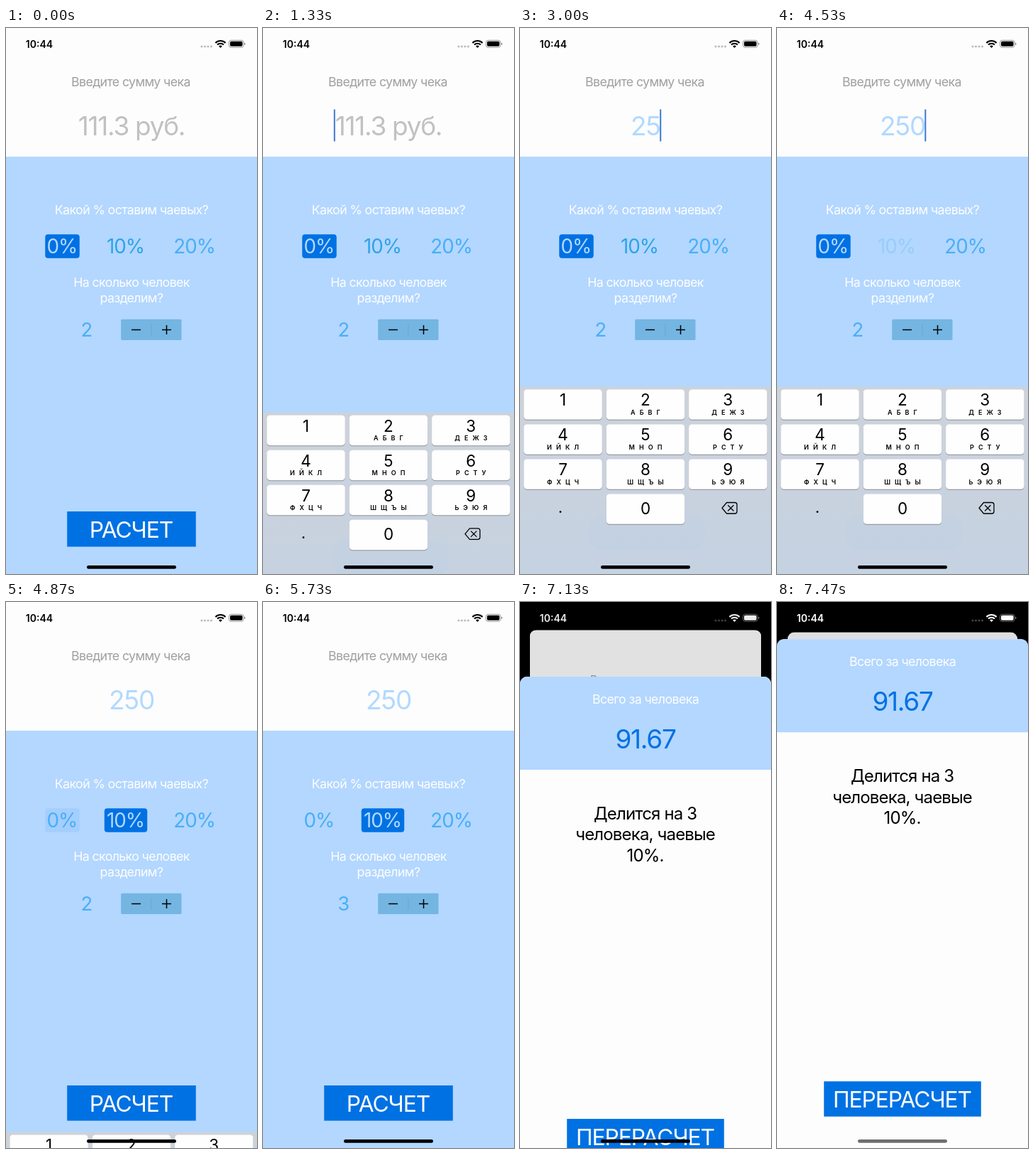
Write an HTML page that moves like this. It is 354 by 768 pixels and loops after 8000 ms.

```html
<!DOCTYPE html>
<html lang="ru">
<head>
<meta charset="utf-8">
<title>Калькулятор чаевых</title>
<style>
  html, body { margin: 0; height: 100%; overflow: hidden; background: #000; }
  svg { display: block; width: 100%; height: 100%; }
  text {
    font-family: Inter, "Noto Sans", sans-serif;
    font-weight: 400;
    letter-spacing: -.035em;
    text-anchor: middle;
    white-space: pre;
  }
  .digit { letter-spacing: 0; }
  .letters { font-weight: 600; letter-spacing: 1.9px; }
  .clock { font-weight: 600; letter-spacing: 0; }
</style>
</head>
<body>
<svg id="stage" viewBox="0 0 354 768"></svg>
<script>
const DURATION = 8000, FPS = 15;
const BLUE = '#0071e3', PALE = '#b3d7ff', SKY = '#4aaef8', WHITE = '#fdfdfe';

const rect = (x, y, w, h, fill, extra = '') =>
  `<rect x="${x}" y="${y}" width="${w}" height="${h}" fill="${fill}" ${extra}/>`;
const text = (x, y, size, fill, content, extra = '') =>
  `<text x="${x}" y="${y}" font-size="${size}" fill="${fill}" ${extra}>${content}</text>`;

const tipOption = (id, x, w, label) =>
  rect(x - w / 2, 290.2, w, 33.6, BLUE, `rx="4" id="${id}Box"`) +
  text(x - .5, 316.5, 27.8, SKY, label, `id="${id}"`);

function key(index, digit, letters) {
  const x = 5.3 + (index % 3) * 116.4, y = 508.5 + Math.floor(index / 3) * 49;
  const mid = x + 55.2;
  return rect(x, y + 1, 110.5, 42.3, '#8b8f96', 'rx="4.5"') +
    rect(x, y, 110.5, 42.3, '#fefefe', 'rx="4.5"') +
    text(mid, y + 22.7, 22.5, '#000', digit, 'class="digit"') +
    text(mid + 1, y + 35.5, 9, '#000', letters.split('').join(' '), 'class="letters"');
}

const keyLetters = ['', 'АБВГ', 'ДЕЖЗ', 'ИЙКЛ', 'МНОП', 'РСТУ', 'ФХЦЧ', 'ШЩЪЫ', 'ЬЭЮЯ'];

const calculator = `
  <g id="calculator" clip-path="url(#card)">
    ${rect(0, 0, 354, 768, PALE)}
    ${rect(0, 0, 354, 181, WHITE)}
    ${text(176, 82, 17.8, '#a0a0a2', 'Введите сумму чека')}
    ${text(177, 151, 37, '#c1c1c3', '', 'id="amount"')}
    ${rect(99.8, 114.5, 2, 45, '#3d7ad0', 'id="caret"')}
    ${text(177, 262, 17.8, WHITE, 'Какой % оставим чаевых?')}
    ${tipOption('tip0', 79.5, 48.5, '0%')}
    ${tipOption('tip10', 169, 60.5, '10%')}
    ${text(265.7, 316.5, 27.8, SKY, '20%')}
    ${text(177, 364.3, 17.8, WHITE, 'На сколько человек')}
    ${text(177, 386, 17.8, WHITE, 'разделим?')}
    ${text(113.3, 434, 27.5, SKY, '', 'id="people"')}
    ${rect(162.2, 409.8, 85.3, 29.2, '#74b5e2', 'rx="1.5"')}
    ${rect(204.4, 416, 1, 17, '#69a9d8')}
    <path d="M177 424.5h13M220 424.5h13M226.5 418v13" stroke="#000" stroke-width="1.5"/>
    ${rect(86.2, 680, 181.6, 49.6, BLUE)}
    ${text(176.5, 716.5, 31.8, WHITE, 'РАСЧЕТ', 'id="calculate"')}
    ${rect(0, 0, 354, 768, '#000', 'id="shade"')}
  </g>`;

const keyboard = `
  <g id="keyboard">
    ${rect(0, 504.5, 354, 264, 'url(#tray)')}
    ${rect(97, 684, 165, 51, '#b9cde3', 'rx="22" opacity=".35"')}
    ${keyLetters.map((letters, i) => key(i, i + 1, letters)).join('')}
    ${key(10, '', '')}
    ${text(177, 684, 22.5, '#000', '0', 'class="digit"')}
    ${text(57, 681.5, 22.5, '#000', '.', 'class="digit"')}
    <path d="M291.5 667.5h11.5q3 0 3 3v9.5q0 3-3 3h-11.5l-6.5-7.75zM293.5 671.5l7.5 7.5m0-7.5l-7.5 7.5"
      fill="none" stroke="#000" stroke-width="1.3" stroke-linejoin="round" stroke-linecap="round"/>
  </g>`;

const sheet = `
  <g id="sheet">
    <path d="M0 900V61.7a9.7 9.7 0 0 1 9.7-9.7h334.6a9.7 9.7 0 0 1 9.7 9.7v838z" fill="${WHITE}"/>
    <path d="M0 183V61.7a9.7 9.7 0 0 1 9.7-9.7h334.6a9.7 9.7 0 0 1 9.7 9.7V183z" fill="${PALE}"/>
    ${text(177, 90, 17.8, WHITE, 'Всего за человека')}
    ${text(177, 153, 37, BLUE, '91.67')}
    ${['Делится на 3', 'человека, чаевые', '10%.']
      .map((line, i) => text(176.6, 253 + i * 29.3, 24, '#000', line)).join('')}
    ${rect(66.2, 674, 221.6, 49.5, BLUE)}
    ${text(176.5, 710.5, 31.8, WHITE, 'ПЕРЕРАСЧЕТ')}
  </g>`;

const statusBar = `
  <g id="status">
    <text class="clock" x="47" y="27.5" font-size="14">10:44</text>
    ${[276, 280.5, 285, 289.5].map(x => `<circle cx="${x}" cy="26" r="1.6" opacity=".25"/>`).join('')}
    <path d="M295.4 20.9a10 10 0 0 1 14.2 0M298 23.6a6.3 6.3 0 0 1 9 0"
      fill="none" stroke="currentColor" stroke-width="2.1"/>
    <path d="M300.1 25.7a3.4 3.4 0 0 1 4.8 0L302.5 28z"/>
    <rect x="314.5" y="17.3" width="20.5" height="10" rx="3" fill="none" stroke="currentColor" opacity=".4"/>
    <rect x="316" y="18.8" width="17.5" height="7" rx="1.7"/>
    <path d="M336 20.5q1.5 .6 1.5 1.8t-1.5 1.8z" opacity=".45"/>
  </g>`;

const stage = document.getElementById('stage');
stage.innerHTML = `
  <defs>
    <clipPath id="card"><rect id="cardShape" width="354" height="768"/></clipPath>
    <linearGradient id="tray" x2="0" y2="1">
      <stop stop-color="#cdd2da"/><stop offset="1" stop-color="#c5d2e2"/>
    </linearGradient>
  </defs>
  ${rect(0, 0, 354, 768, '#000')}
  ${calculator}${keyboard}${sheet}${statusBar}
  ${rect(114, 756, 126, 4.8, '#000', 'rx="2.4" id="home"')}`;

const parts = {};
stage.querySelectorAll('[id]').forEach(el => parts[el.id] = el);
const set = (id, attrs) => {
  for (const name in attrs) parts[id].setAttribute(name, attrs[name]);
};

// Critically damped spring from 0 to 1, beginning at the given time.
const spring = (t, start) => {
  const u = Math.max(0, t - start) * .0183;
  return 1 - (1 + u) * Math.exp(-u);
};
const ramp = (t, from, to) => Math.min(1, Math.max(0, (t - from) / (to - from)));
const gray = level => `rgb(${[level, level, level].map(Math.round)})`;

const TYPING = [[0, '', 100.8], [2260, '2', 187.5], [2990, '25', 198.2], [3260, '250', 209.3]];
const TIP_DOWN = 4525, TIP_UP = 4660;

function caretOpacity(t) {
  if (t < 1060 || t >= TIP_UP) return 0;
  if (t < 2040) return 1 - ramp(t, 1600, 1800);
  if (t < 2260) return ramp(t, 2000, 2130);
  if (t < 2990) return 1 - ramp(t, 2540, 2800);
  return 1 - ramp(t, 3870, 4070) + ramp(t, 4210, 4530);
}

function draw(t) {
  const [, typed, caretX] = TYPING.filter(step => t >= step[0]).pop();
  parts.amount.textContent = typed || '111.3 руб.';
  set('amount', { fill: typed ? '#b2d9ff' : '#c1c1c3' });
  set('caret', { x: caretX - 1, opacity: caretOpacity(t) });
  parts.people.textContent = t < 5595 ? '2' : '3';

  const chosen = t >= TIP_UP;
  set('tip0Box', { opacity: 1 - ramp(t, TIP_UP, 4885) });
  set('tip0', { fill: chosen ? SKY : PALE });
  set('tip10Box', { opacity: chosen ? 1 : 0 });
  set('tip10', {
    fill: chosen ? PALE : '#2fa3e8',
    opacity: t < TIP_DOWN ? 1 : .2 + .8 * ramp(t, TIP_UP, 4860)
  });

  const hidden = 1 - spring(t, 1143) + spring(t, 4645);
  set('keyboard', { transform: `translate(0 ${264 * hidden})` });

  set('calculate', { opacity: t < 6795 ? 1 : .22 + .78 * ramp(t, 6900, 7100) });
  const shown = spring(t, 6900);
  const scale = 1 - .085 * shown;
  set('calculator', {
    transform: `translate(177 ${384 + 10 * shown}) scale(${scale}) translate(-177 -384)`
  });
  set('cardShape', { rx: 10.5 * shown });
  set('shade', { opacity: .12 * shown });
  set('sheet', { transform: `translate(0 ${720 * (1 - shown)})` });
  set('status', { fill: gray(255 * shown), color: gray(255 * shown) });
  set('home', { fill: gray(112 * ramp(t, 7150, 7470)) });
}

function tick() {
  const t = performance.now() % DURATION;
  draw(Math.floor((t + 4) * FPS / 1000) * 1000 / FPS % DURATION);
  requestAnimationFrame(tick);
}
tick();
</script>
</body>
</html>
```
